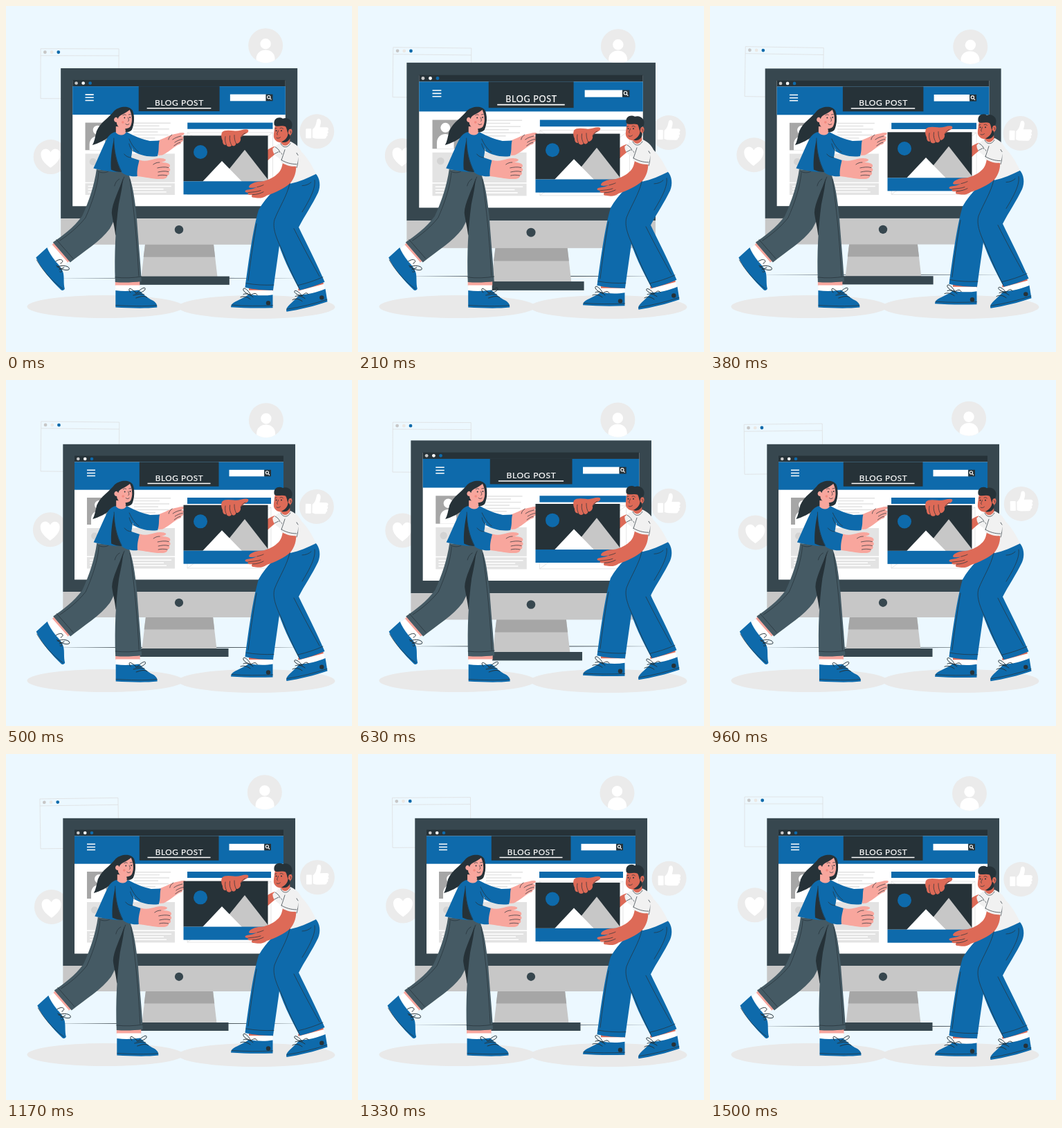
An HTML page that plays this animation: 500x500 px, repeating every 1.54 s.

```html
<!DOCTYPE html>
<html lang="en">
<head>
<meta charset="utf-8">
<title>Blog post</title>
<style>
  html, body { margin: 0; width: 100%; height: 100%; overflow: hidden; background: #ecf8ff; }
  svg { display: block; width: 100vw; height: 100vh; }
  .blue { fill: #0e6aab; }
  .ink { fill: #263238; }
  .slate { fill: #37474f; }
  .gray { fill: #c7c7c7; }
  .mid { fill: #a6a6a6; }
  .pale { fill: #e3e3e3; }
  .white { fill: #fff; }
  .rose { fill: #f8a69d; }
  .tan { fill: #dd6a57; }
  .pants { fill: #455a64; }
  .shirt { fill: #f1f1f1; }
  .line { fill: none; stroke: #263238; stroke-width: .7; stroke-linecap: round; stroke-linejoin: round; }
  .lace { stroke-width: 1; }
  .rule { fill: none; stroke: #fff; stroke-width: 1.5; }
  .text { fill: none; stroke: #e2e2e2; stroke-width: 1.4; }
  .thin { fill: none; stroke: #dcdcdc; stroke-width: .7; }
</style>
</head>
<body>
<svg viewBox="0 0 500 500">
  <defs>
    <clipPath id="badge"><circle cx="375" cy="57" r="25"/></clipPath>
  </defs>

  <rect width="500" height="500" fill="#ecf8ff"/>
  <g fill="#e9e9e9">
    <ellipse cx="143.500" cy="434.500" rx="113" ry="16.500"/>
    <ellipse cx="362" cy="435" rx="113.500" ry="17"/>
  </g>

  <g id="icons">
    <path class="thin" d="M50 62H163V134H50ZM50 72H163"/>
    <circle class="gray" cx="56.300" cy="67" r="2.400"/>
    <circle cx="66" cy="67" r="2.400" fill="#ebe8e4"/>
    <circle class="blue" cx="75.700" cy="67" r="2.400"/>
    <g fill="#ebebeb">
      <circle cx="375" cy="57" r="25"/>
      <circle cx="449.300" cy="181" r="25"/>
      <circle cx="64.700" cy="218.300" r="25"/>
    </g>
    <g class="white">
      <g clip-path="url(#badge)">
        <circle cx="375" cy="54.500" r="7.700"/>
        <path d="M361.500 84V76C361.500 59 388.500 59 388.500 76V84Z"/>
      </g>
      <path d="M64.500 234C56 228 50.500 222 50.500 214.500C50.500 206 60.500 203.500 64.500 211.500C68.500 203.500 78.500 206 78.500 214.500C78.500 222 73 228 64.500 234Z"/>
      <rect x="433.300" y="177" width="8" height="14" rx="1"/>
      <path d="M443 178C447 175 448 171 449 166C449.500 161 455 161.500 455 167C455 170 454 173 453.500 175H463C467 175 466.500 179.500 464.500 180C466.500 181.500 466 184 464 184.500C465.500 186 465 188 463 188.500C463 190.500 462 191.500 460 191.500H449C446.500 191.500 445 190.500 443 190Z"/>
    </g>
  </g>

  <path id="floor" class="ink" d="M66 393.600L160 393.250L250 393.100L340 393.250L434 393.600L340 393.950L250 394.100L160 393.950Z"/>

  <g id="monitor">
    <path class="gray" d="M202 342H299L304.500 389H196.500Z"/>
    <path class="mid" d="M202 342H299L301.200 360.500H199.600Z"/>
    <rect class="slate" x="178.500" y="388" width="143" height="12"/>
    <rect class="slate" x="82.300" y="92.800" width="335.700" height="213.200"/>
    <rect class="gray" x="82.300" y="306" width="335.700" height="37"/>
    <circle class="slate" cx="250" cy="321.800" r="6.100"/>
    <rect class="white" x="99" y="110" width="302" height="178.500"/>
    <rect class="ink" x="99" y="109.500" width="302" height="9"/>
    <circle class="gray" cx="104.300" cy="114" r="2.300"/>
    <circle class="white" cx="114.200" cy="114" r="2.300"/>
    <circle class="blue" cx="124" cy="114" r="2.300"/>
    <rect class="blue" x="99" y="118.500" width="302" height="40.200"/>
    <rect class="ink" x="192.800" y="118.500" width="114.700" height="35.300"/>
    <text x="250.500" y="145.900" text-anchor="middle" font-family="Lato, sans-serif" font-size="11.700" letter-spacing=".66" fill="#fff" stroke="#fff" stroke-width=".2">BLOG POST</text>
    <path class="rule" d="M204.500 149.500H295.500M117 130.300H129M117 134.400H129M117 138.500H129"/>
    <rect class="white" x="322.500" y="129.800" width="51" height="9.500"/>
    <rect class="ink" x="373.200" y="129.800" width="9.800" height="9.500"/>
    <path class="rule" style="stroke-width:1.1" d="M378.900 135.300L381 137.500M379.500 133.800A2.100 2.100 0 1 0 375.300 133.800A2.100 2.100 0 1 0 379.500 133.800"/>

    <rect class="mid" x="117" y="170" width="54" height="39"/>
    <circle class="white" cx="134.500" cy="180.500" r="6.500"/>
    <path class="white" d="M123 209V201C123 185 146 185 146 201V209Z"/>
    <path class="text" d="M185 170.700H238M185 174.600H222M185 179H236M185 183.200H220M185 187.500H235M185 191.700H216"/>
    <rect class="pale" x="117" y="214" width="127" height="40.500"/>
    <circle cx="128" cy="225.500" r="5" fill="#d3d3d3"/>
    <rect class="pale" x="117" y="256" width="127" height="16.500"/>
    <path class="rule" d="M121 260.300H239M121 264.300H228M121 268.300H232"/>
    <rect class="blue" x="262" y="170" width="121" height="9"/>
    <path class="thin" d="M262 184H383V272H262ZL383 272M383 184L262 272"/>
  </g>

  <g id="woman">
    <!-- rear foot -->
    <path class="rose" d="M70 341L66 346L88 371L95 367Z"/>
    <path class="white" d="M67 345L60 351L81 378L89 370Z"/>
    <path class="blue" d="M59.500 349L43.500 363.500C50 379 66 397 80 410.500C82 411.500 84.500 410.500 85 408.500C83 400 84.500 393 83 386C81 378 75 373 71 368C66 362 62 355 59.500 349Z"/>
    <path class="line" d="M44.500 367C53 382 67 398 82 408.500"/>
    <path class="line lace" d="M72 369C80 363 86 369 79 372M73 375C80 380 84 386 78 384M74 377C84 373 94 377 91 381C86 383 80 380 75 377M77 381L84 378"/>
    <!-- front foot -->
    <path class="rose" d="M158 398H193.500V404H158Z"/>
    <path class="white" d="M158.500 403.500H193V413H158.500Z"/>
    <path class="blue" d="M158.500 411C170 412.500 181 412 192 410.500C197 415 202 420 209 424C215 426.500 219 430 218.500 435.500C200 437.500 178 436.500 158.500 435.500Z"/>
    <path class="line" d="M159 432.500C178 433.500 200 434.500 218 432.500"/>
    <path class="line lace" d="M180 414C176 409 178 406 184 411L189 415C196 407 203 405 201 410C198 414 192 415 187 415M184 418C190 417 196 415 200 417M188 422C194 420 200 418 204 421"/>
    <!-- trousers -->
    <path class="pants" d="M131 236C128 258 120 283 110 304C98 320 81 333 68 341.500L93 370.500C112 355 137 340 150 322C156 312 161 298 165 286L178 241Z"/>
    <path class="ink" d="M170 247C164 266 153 285 153 299C154 308 157 318 158.500 332L171 292Z"/>
    <path class="pants" d="M176 240C183 255 186.500 280 189 305C191.500 340 194.500 370 196 398C184 399.500 170 400 158 399C156.500 358 158.500 320 163 287C166 272 169 260 170 240Z"/>
    <path class="line" d="M73 337.500L97 365M158 392C170 393.500 184 393 196 391M134 241C133 260 124 286 115 306C104 320 90 331 78 339M133 239C139 242 145 241 148 239M171 247C165 262 160 281 157 297M179 250C186 300 190 348 192 390M164 250C160 252 158 256 157 260"/>
    <!-- hair behind -->
    <path class="ink" d="M183 151C178 143 164 145 157 151C149 162 137 167 131 181C129 189 128 196 125 201C133 199 146 193 155 184C162 180 174 184 182 179C186 170 186 158 183 151Z"/>
    <!-- far arm -->
    <path class="rose" d="M219 195C227 192 234 188 240 186C247 185 253 182 257.500 183.500C259 185 256 187 253 188C257 188 258 190 256 192C257 194 256 196 253 197C254 199 251 200 248 201C241 205 234 212 226 215.500L220 216Z"/>
    <path class="line" d="M253 188C249 189 245 190 241 193M255 192.500C251 193 247 195 244 197M252 197C248 198 246 200 243 202M240 186C237 188 235 191 235 193"/>
    <path class="blue" d="M176 183C186 188 198 193 208 195L222 194.500C220 201 222 208 219 217C205 219 193 215 184 210Z"/>
    <!-- torso and near arm -->
    <path class="rose" d="M159 174L172 175L174 186C170 190 163 189 159 184Z"/>
    <path class="blue" d="M158 182C163 188 171 188 174 182C182 185 184 192 183 202C183 208 182 214 181 219L193 223L190 246C182 247 172 245 167 240C155 240 139 238 126.500 234.500C134 219 140 203 147 190C151 185 154 183 158 182Z"/>
    <path class="ink" d="M156 193C153 207 151 223 152 236.500C157 239 162 240 167 240C160 227 156 210 156 193Z"/>
    <path class="line" d="M156 191C156 209 160 226 167 239M178 192C181 199 186 207 192 211M181 219C177 219 173 217 171 214M184 210C180 206 179 203 178 199"/>
    <path class="rose" d="M193 222.500C201 225 208 223 215 221C222 219 230 220.500 231 222C232 224 226 226 222 226C228 226 235 226.500 236.500 229C238 231 237 233 235 233.500C238.500 235 238 239 235 239.500C237.500 241 236 245 233 245C234 248 230 250 225 250C213 250.500 201 247 190 246C189 238 191 230 193 222.500Z"/>
    <path class="line" d="M222 226C218 226 216 227 213 229M235 233.500C229 232 224 233 219 234M235 239.500C229 238 225 239 220 240M233 245C228 244 224 244 220 245"/>
    <!-- face -->
    <path class="rose" d="M163 156C168 156 174 152 179 149.500C183 155 184 165 182 171C180 177 173 178 168 177C163 176 160 172 160 168C156 168 155 163 158 161C160 160 161 161 162 163Z"/>
    <path class="ink" d="M180 149C174 144 162 147 158 153C157 156 157 159 158 161C160 160 161 161 162 163C163 157 173 156 180 149Z"/>
    <path class="ink" d="M178 148C186 151 187 168 181 180C178 182 175 183 172 182C179 179 183 170 182 162C182 157 180 152 178 148Z"/>
    <circle cx="169" cy="168" r="1.800" fill="#f28b80"/>
    <circle class="ink" cx="171.500" cy="161.500" r=".9"/>
    <circle class="ink" cx="179.300" cy="161" r=".9"/>
    <path class="line" d="M169 158C170.500 156.500 172 156.500 173.500 157.500M177.500 157L180.500 156.500M176.500 161C177 164 179 166 176.500 166.500M173 170.500C174.500 172 176.500 172 178 170.500"/>
  </g>

  <g id="lift">
    <!-- picture -->
    <path class="tan" d="M388 203C382 205 377 208 374 212V227C380 222 386 216 391 213Z"/>
    <rect class="ink" x="256.500" y="187.700" width="122" height="66"/>
    <circle class="blue" cx="281" cy="211.400" r="10"/>
    <path class="gray" d="M345 208L378.500 251V254H338L320 239Z"/>
    <path class="white" d="M284 254L312 224.300L341 254Z"/>
    <rect class="blue" x="256.500" y="253.700" width="122" height="19"/>
    <!-- far hand -->
    <path class="tan" d="M312 183C315 179 323 180 329 180.500C335 182 341 178.500 347 178.500C351.500 178.500 351 182 348 184C343 186 341 189 339 191C340 196 336 199.500 332.500 199C331.500 203 328 203.500 326 201.500C324 205 320 204 318.500 201C315 202 313 199 313 195C311 191 310.500 187 312 183Z"/>
    <path class="line" d="M317 189C316 194 317 198 318.500 201M323.500 188C322.500 194 324 198 326 201.500M330 187C330 193 331 196 332.500 199M339 191C340 188 343 185 346 184"/>
    <!-- socks -->
    <path class="tan" d="M351 406H386V412H351ZM422 409L458 398L459 403L423 413Z"/>
    <path class="white" d="M351 411H385.500V420H351ZM422 412L459 402L461 411L424 420Z"/>
    <!-- shoes -->
    <path class="blue" d="M385.500 417.500C374 419.500 361 419 351 416.500C345 422 335 425 329 429C326 431 325 433 325 435.500C344 437 366 437 385.500 436.500Z"/>
    <path class="blue" d="M461.500 409C450 414 437 417 424 417.500C419 424 411 430 407 435C405 437 404.500 440 405.500 442C424 439 446 434 464.500 427.500Z"/>
    <circle class="ink" cx="379" cy="429.500" r="3.200"/>
    <circle class="ink" cx="456.300" cy="421.700" r="3.200"/>
    <path class="line" d="M326 432.500C345 434 366 434 385.500 433M406 438.500C426 435.500 446 430.500 464 424.500"/>
    <path class="line lace" d="M363 418C361 414 357 416 354 418C348 408 342 406 343 411C345 415 350 417 354 418M343 417C347 415 352 417 357 421M339 421C344 419 349 421 353 424M437 417C434 413 431 416 428 419C421 411 416 410 417 414C419 417 424 419 428 419M418 420C423 418 428 420 432 423M414 425C419 422 424 424 428 427"/>
    <!-- trousers -->
    <path class="blue" d="M412 250C395 258 376 275 365 295C357 322 351 366 345.500 407C358 410 373 411 386 411C389 388 393 362 396 339L420 295L430 250Z"/>
    <path class="blue" d="M406 256C420 251 435 246 447 242C454 249 455 261 451 270C443 287 431 304 423 320C434 343 449 372 460.500 399C449 404 437 408 424.500 411C411 386 398 360 391 334C384 316 389 306 394 296C401 281 408 268 409 256Z"/>
    <path class="line" d="M410 257C406 275 395 291 388 309C384 324 394 342 401 358C408 376 416 393 424 409M347 401C360 403.500 374 404 387 403.500M422 404C435 401 447 397 458 392M446 252C448 263 439 280 428 298M428 260C433 260 438 258 441 255M362 315C357 344 353 371 350 397M416 322C428 346 442 372 453 391"/>
    <!-- neck and shirt -->
    <path class="tan" d="M397 190H410L411 204C407 208 400 206 397 203Z"/>
    <path class="shirt" d="M397 197C400 204 407 204 411 196C418 199 424 204 427 211C436 220 443 232 448 243C436 249 424 254 411 257C410 246 408 235 404 226L397 222C393 219 390 217 388 215C386 212 385 208 385.500 206C389 203 393 200 397 197Z"/>
    <path class="line" d="M398 213C401 220 405 224 409 226M420 213C423 220 422 228 420 234M397 199C400 206 407 206 411 199M389 204C392 206 395 208 396 212M388 214L394 211"/>
    <!-- near arm -->
    <path class="tan" d="M400 226C406 230 413 231 419 230C420 239 417 249 411 256C402 264 389 270 377 274C371 279 363 278 358 277C355 277 354 275 356 273C351 274 348 272 350 270C345 270 344 267 348 266C354 265 359 264 363 262C358 263 353 264 351 262C351 258 358 255 365 254C375 254 386 249 392 243C397 239 399 233 400 226Z"/>
    <path class="line" d="M350 270C357 269 363 269 368 267M356 273C363 273 368 271 372 269M363 262C367 261 370 260 372 259"/>
    <path class="shirt" d="M399 205C408 204 417 208 422 215C423 221 421 227 420 232C412 233 404 230 397 226C399 219 399 212 399 205Z"/>
    <path class="line" d="M398 223C405 227 412 229 420 229M403 208C401 214 400 218 398 223M420 213L422 216"/>
    <!-- head -->
    <path class="tan" d="M389 171C388 178 386.500 186 387 190C388 195 394 198.500 400 197.500C406 197 410 192 411 187C415 184 414 177 410.500 178L407 171Z"/>
    <path class="ink" d="M387.500 171C386.500 162 395 160 400 163C408 160 414 167 413.500 172C413.500 176 412 178 410.500 178C408.500 178 408 181 407.500 185C406 181 406 177 404 174.500C399 172.500 393 175 389.500 173.500C388 173 387.500 172 387.500 171Z"/>
    <path class="ink" d="M407.500 184C407.500 190 403 194.500 398 196.500C402 198.500 407 197 409.500 193C411 190 411 188 410 186.500Z"/>
    <circle class="ink" cx="390.500" cy="180.500" r="1"/>
    <circle class="ink" cx="398" cy="180.500" r="1"/>
    <path class="line" d="M388.500 177.500L391 177M396 177C398 176 399.500 176.500 400.500 178M393.500 180.500C393 183.500 390 185.500 392.500 186.500M391 191C392.500 192 395 191.500 396.500 190M410.500 181C411.500 181 412 182 411.500 184"/>
  </g>
</svg>
<script>
  const LOOP = 1540, CYCLE = 1500, STEP = 1000 / 24, LEAD = 28;
  const part = id => document.getElementById(id);
  const [icons, floor, monitor, woman, lift] =
    ["icons", "floor", "monitor", "woman", "lift"].map(part);

  // Keyframes are [progress, value] pairs joined by straight segments.
  const beat = [[0, 1], [.1, 1.1], [.3, 1], [.4, 1], [.5, 1.1], [.6, 1], [1, 1]];
  const sway = [[0, 0], [.25, 1], [.75, -1], [1, 0]];
  const rise = [[0, 0], [.5, -10], [1, 0]];
  const shake = [[0, 0], [.1, -1], [.2, 2], [.3, -4], [.4, 4], [.5, -4],
                 [.6, 4], [.7, -4], [.8, 2], [.9, -1], [1, 0]];

  function at(keys, p) {
    const i = Math.max(1, keys.findIndex(k => k[0] >= p));
    const [a, u] = keys[i - 1], [b, v] = keys[i];
    return u + (v - u) * (p - a) / (b - a);
  }

  function draw(ms) {
    const step = Math.floor((ms % LOOP + 4.9) / STEP) % 37;
    const p = Math.min(1, (step * STEP + LEAD) / CYCLE);
    const up = `translate(0 ${at(rise, p)})`;
    monitor.setAttribute("transform",
      `translate(250 246.5) scale(${at(beat, p)}) translate(-250 -246.5)`);
    icons.setAttribute("transform", `rotate(${at(sway, p)} 257 137.5)`);
    woman.setAttribute("transform", `translate(${at(shake, p)} 0)`);
    lift.setAttribute("transform", up);
    floor.setAttribute("transform", up);
  }

  const start = performance.now();
  function tick() {
    draw(performance.now() - start);
    requestAnimationFrame(tick);
  }
  tick();
</script>
</body>
</html>
```
